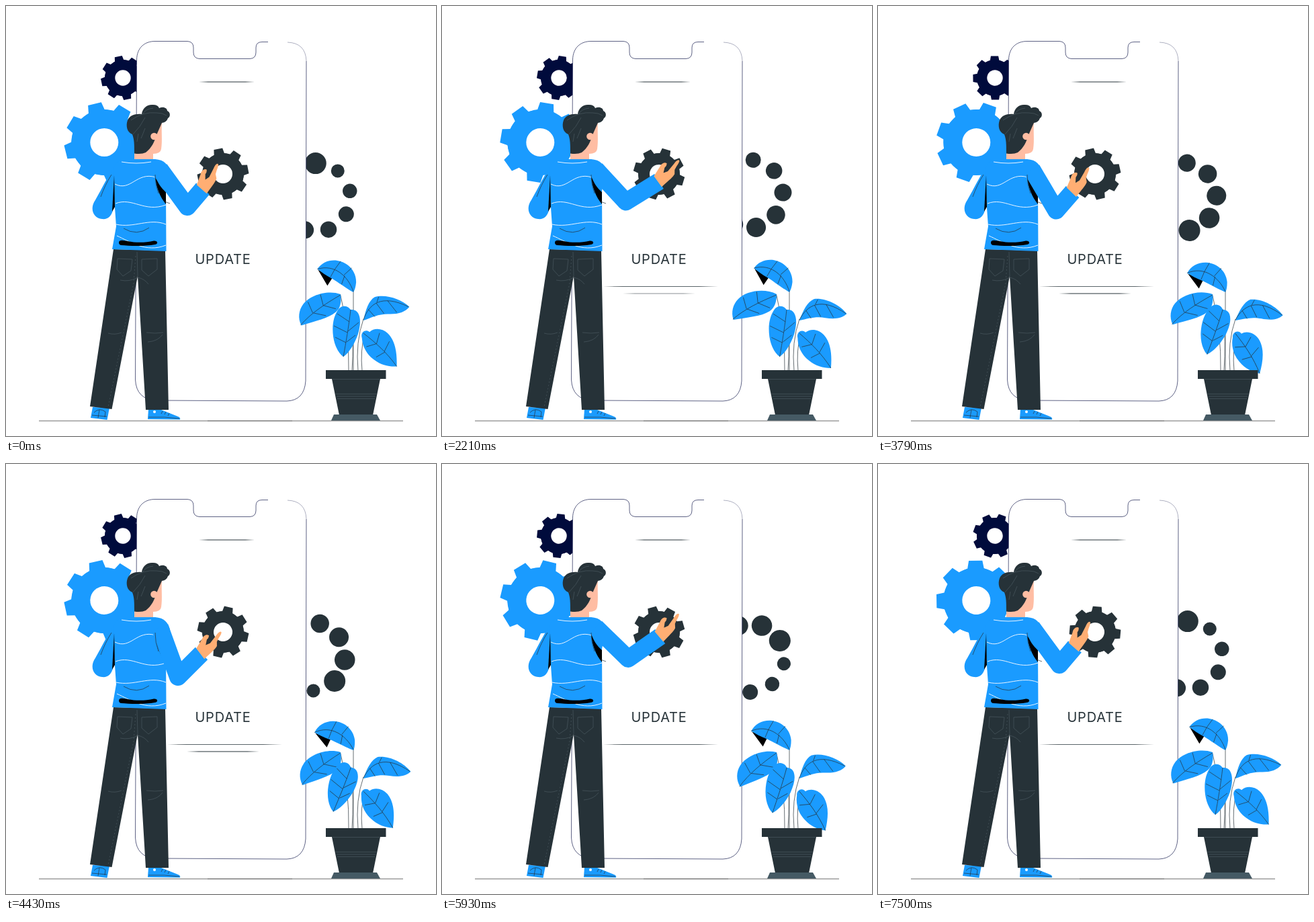
An HTML page that plays this animation: 640x640 px, repeating every 7.71 s.

```html
<!DOCTYPE html>
<html lang="en">
<head>
<meta charset="utf-8">
<title>Update</title>
<style>
  html, body { margin: 0; width: 100%; height: 100%; overflow: hidden; background: #fff; }
  svg { display: block; width: 100vw; height: 100vh; }
  .blue { fill: #1a9bff; }
  .dark { fill: #263238; }
  .navy { fill: #000b3c; }
  .black { fill: #000; }
  .white { fill: #fff; }
  .face { fill: #ffbda3; }
  .hand { fill: #ffae73; }
  .line { fill: none; stroke: #263238; stroke-width: .7; }
  .wave { fill: none; stroke: #e8f4ff; stroke-width: 1; }
  .seam { fill: none; stroke: #4a585f; stroke-width: .7; }
  .edge { fill: none; stroke: #2a2f5c; stroke-width: .75; }
  .sleeve { fill: none; stroke: #1a9bff; stroke-width: 26; stroke-linejoin: round; }
  text { font: 400 20px Inter, "Open Sans", sans-serif; letter-spacing: .8px; }
</style>
</head>
<body>
<svg viewBox="0 0 640 640">
  <g id="smallGear"></g>
  <g id="bigGear"></g>
  <g id="ring" class="dark"></g>

  <!-- phone -->
  <path class="white" d="M194.500 80C195 62 206 52.500 222 52.500H270Q279 53 279 62V69Q279 78 288 78.500H363Q372 78 372 69V62Q372 53.500 381 53.500H418Q446 54 447 82L446 558Q444 587 418 588L224 587Q194 586 192.500 556Z"/>
  <path class="edge" d="M447 82L446 558Q444 587 418 588L224 587Q194 586 192.500 556L194.500 80C195 62 206 52.500 222 52.500H270Q279 53 279 62V69Q279 78 288 78.500H363Q372 78 372 69V62Q372 53.500 381 53.500H390"/>
  <path class="edge" stroke-opacity=".5" d="M419 54Q446 55 447 82"/>
  <path id="header" class="dark"/>
  <path id="lineA" class="dark"/>
  <path id="lineB" class="dark"/>
  <text class="dark" x="323" y="384" text-anchor="middle">UPDATE</text>
  <g id="screenGear"></g>

  <path d="M49 617.500H591" stroke="#9b9b9b" stroke-width="1.400"/>
  <path d="M300 617.500H426" stroke="#6d6d6d" stroke-width="1.200"/>

  <!-- man -->
  <path class="blue" d="M129 597L154 598L150.500 616L126 613Z"/>
  <path class="blue" d="M212 600L231 601L257 611.500Q260 613 259 615.500L211 615Z"/>
  <path class="line" d="M131 605Q139 597 148 604L147 612M128 609L150 611M139 601L137 613M233 603L231 607M238 604L236 608M243 606L241 610M212 612Q236 611 258 614"/>
  <circle class="white" cx="221" cy="604" r="2"/>
  <path class="dark" d="M160 362L125 596L157.500 600L196 402L208 601L242 601L237 364Z"/>
  <path class="seam" d="M166 376L165 392L174 402L186 394L188 377ZM202 377V393L212 402L225 392V376ZM195 366L196 402M170 408Q184 411 196 404Q206 406 212 414M152 487Q162 490 172 486M209 486Q222 488 234 486M211 500Q226 499 233 489"/>
  <path class="seam" stroke-dasharray="2 3" d="M193 372L190 412L152 597"/>
  <path class="blue" d="M163 236C152 252 139 279 131 292C125 304 131 316 143 317C151 318 157 313 159 304L163 280Z"/>
  <path class="line" d="M157 251C150 262 145 273 141 284"/>
  <path class="blue" d="M160 246C161 234 168 228 180 228H222C236 229 241 236 244 246L238 275L238.500 365L158 362L164 328L162 300Z"/>
  <path class="black" d="M161 252L158 306L162 299Z"/>
  <path class="wave" d="M172 232Q194 236 216 232M162 265C186 277 194 246 223 255M163 294C188 284 206 308 238 296M164 325C190 331 214 315 238 325M165 342C184 350 208 368 238 356"/>
  <path class="line" d="M175 331Q195 343 213 330"/>
  <path class="black" d="M168 352C168 347 176 349 181 350C195 353 209 352 220 349.500C226 349 227 354 222 355C205 358 184 357 171 356Q168 355 168 352Z"/>
  <path class="black" d="M222 252C223 269 229 284 238 295V277C230 270 225 262 222 252Z"/>
  <path class="line" d="M236 291L244 294"/>
  <path id="arm" class="sleeve"/>
  <path class="line" d="M222 251Q222 266 227 279"/>
  <path class="face" d="M232 171C231 188 233 200 231 213Q230 220 219 220V228H191V218L212 208L222 182Z"/>
  <path class="dark" d="M191 219.500C191 206 191 199 188 191C180 188 178 178 181 170C184 163 192 160 202 161C203 152 210 146 219 147Q226 147 228 152C234 149 240 152 240 156C245 158 245 165 241 167Q239 173 232 174L224 192C221 202 217 211 208 218Q202 221 191 219.500Z"/>
  <circle class="face" cx="220.500" cy="194" r="5.300"/>
  <path class="seam" d="M186 170Q204 157 224 159Q233 159 239 163M203 161Q208 153 219 152M189 191Q200 180 207 166M207 182Q204 190 201 197M197 190L195 202"/>
  <g id="hand">
    <path class="dark" d="M-1 -26L9 -31L7 -18L0 -13Z"/>
    <path class="hand" d="M-10 -4L-7.500 -20C-7.500 -26 -4 -30 0 -29Q1.500 -26 -.5 -22L1 -14L6 -19L10 -33C11 -38 13 -42 15.500 -40.500Q16.500 -38 15 -31L14.500 -25L17 -19C16 -12 12 -6 7 6Z"/>
  </g>

  <!-- plant -->
  <path class="line" d="M517 424V543M498 431Q511 485 510 543M514 455Q518 500 515 543M532 466Q520 500 524 543M534 488Q527 512 530 543"/>
  <g id="leafD">
    <path class="blue" d="M530 494C527 486 535 480 541 485C548 478 560 479 568 486C580 497 583 515 583 535C572 536 560 534 549 526C537 518 531 506 530 494Z"/>
    <path class="line" d="M532 487C550 500 568 515 583 535M552 502L556 486M564 513L571 498M552 502L537 507M565 514L552 522"/>
  </g>
  <g id="leafE">
    <path class="blue" d="M532 468C536 452 541 439 550 434C566 430 589 438 601 450.500C595 458 584 461 570 460C555 459 545 464 532 468Z"/>
    <path class="line" d="M532 467C541 444 560 429 600 450.500M553 442L556 434M552 443L563 459M569 440L582 458M540 452L549 463"/>
  </g>
  <g id="leafB">
    <path class="blue" d="M498 429C500 440 499 450 492 456C481 466 464 470 442 478.500C436 468 437 456 443 447C452 433 478 423 498 429Z"/>
    <path class="line" d="M441 478C455 460 475 445 498 430M458 459L450 443M473 447L468 431M459 459L478 462M473 447L492 451"/>
  </g>
  <g id="leafC">
    <path class="blue" d="M513 452C508 445 500 445 495 451C487 462 485 476 487 492C489 506 495 517 502 522C512 515 520 500 524 488C528 474 528 464 524 457C521 452 516 452 513 452Z"/>
    <path class="line" d="M513 452C510 478 506 500 502 522M511 470L493 458M508 486L488 476M506 501L490 493M509 484L525 471M507 500L520 490"/>
  </g>
  <g id="leafA">
    <path class="black" d="M463 395L485 406L478 418Z"/>
    <path class="blue" d="M462 394C468 384 479 379 491 380C508 382 520 395 520.500 411Q520 421 517 426C503 419 492 411 484 407C475 403 468 398 462 394Z"/>
    <path class="line" d="M462 394C487 385 508 402 517 425M488 393L496 381M502 401L513 390M488 393L482 405M503 402L499 415"/>
  </g>
  <path class="dark" d="M476 542H565.500V555H557L546 609H496L485 555H476Z"/>
  <path fill="#455a64" d="M488 608H552L557 617H484Z"/>
  <path class="seam" d="M486 555.500H556M491 577.500H551M492 581H550M493 584.500H549"/>
</svg>
<script>
// All parts rest between the end of CYCLE and the end of LOOP.
const LOOP = 7710, CYCLE = 7140, TAU = Math.PI * 2;
const $ = id => document.getElementById(id);
const set = (id, name, value) => $(id).setAttribute(name, value);
const polar = (r, deg) => [r * Math.cos(deg * TAU / 360), r * Math.sin(deg * TAU / 360)];
const clamp = v => Math.max(0, Math.min(1, v));
const fade = (t, start) => clamp((t - start) / 300);

// Eight-toothed gear around the origin, with a tooth at `phase` degrees.
function makeGear(id, x, y, outer, body, hole, phase, cls) {
  const points = [];
  for (let a = phase; a < phase + 360; a += 45) {
    points.push(polar(body, a - 14.5), polar(outer, a - 9.7), polar(outer, a + 9.7), polar(body, a + 14.5));
  }
  $(id).innerHTML = `<circle class="${cls}" r="${body}"/><polygon class="${cls}" points="${points}"/>
    <circle class="white" r="${hole}"/>`;
  return deg => set(id, 'transform', `translate(${x} ${y}) rotate(${deg})`);
}

const turnBig = makeGear('bigGear', 146.3, 203, 60, 49, 21, 31, 'blue');
const turnSmall = makeGear('smallGear', 174, 107, 33, 27, 11.7, 33, 'navy');
const turnScreen = makeGear('screenGear', 323, 250, 38.5, 31, 14, 34, 'dark');

// Thin rule that tapers to points at both ends.
function taper(id, x1, x2, y) {
  const inset = (x2 - x1) / 6;
  set(id, 'd', `M${x1} ${y}L${x1 + inset} ${y - .4}H${x2 - inset}L${x2} ${y}L${x2 - inset} ${y + .4}H${x1 + inset}Z`);
}
taper('header', 287, 370, 113);
taper('lineA', 240, 411, 417.3);
taper('lineB', 269, 377, 428);

// Nine dots growing clockwise; the ring turns about a slightly offset pivot.
$('ring').innerHTML = Array.from({ length: 9 }, (_, i) => {
  const [x, y] = polar(51, -51 + i * 40);
  return `<circle cx="${x + 4.4}" cy="${y + .9}" r="${10 + i * .75}"/>`;
}).join('');

// Smooth closed curve through rows of [phase, ...values], phase in 0..1.
function closedCurve(keys, p) {
  const n = keys.length;
  const time = k => keys[(k + n) % n][0] + Math.floor(k / n);
  const i = keys.filter(k => k[0] <= p).length - 1;
  const span = time(i + 1) - time(i), u = (p - time(i)) / span;
  const ease = u * u * (3 - 2 * u);
  return keys[i].slice(1).map((_, c) => {
    const value = k => keys[(k + n) % n][c + 1];
    const slope = k => (value(k + 1) - value(k - 1)) / (time(k + 1) - time(k - 1)) * span;
    return value(i) + (value(i + 1) - value(i)) * ease
      + u * (1 - u) * (slope(i) * (1 - u) - slope(i + 1) * u);
  });
}

// Key poses of one swipe: phase, elbow, wrist
const swipe = [
  [0, 270, 299, 293, 272],
  [.24, 256, 317, 291, 282],
  [.36, 257, 304, 293, 287],
  [.48, 263, 297, 315, 275],
  [.86, 288, 286, 325, 244]
];

// Each leaf swings on a cosine: swings per cycle, mean, amplitude, phase of the peak
const leaves = [
  { id: 'leafA', pivot: '517 425', swings: 1, mean: 0, amp: 6, peak: .18 },
  { id: 'leafB', pivot: '498 430', swings: 1, mean: 4.3, amp: 6.8, peak: .28 },
  { id: 'leafC', pivot: '515 453', swings: 1, mean: 4.5, amp: 8.5, peak: .66 },
  { id: 'leafD', pivot: '531 486', swings: 3, mean: 7.5, amp: 8, peak: .62 },
  { id: 'leafE', pivot: '532 467', swings: 1, mean: 3, amp: 5.5, peak: .46 }
];

function draw(t) {
  const cycle = clamp(t / CYCLE);

  // The back gears pause briefly late in the cycle.
  const turn = 360 / CYCLE * (Math.min(t, 5700) + Math.max(0, Math.min(t, CYCLE) - 5957));
  turnBig(-turn);
  turnSmall(turn);
  turnScreen(286 * clamp(t / 7500) ** 1.12);
  set('ring', 'transform', `translate(457.300 284.200) rotate(${-360 * cycle})`);
  set('lineA', 'opacity', fade(t, 650));
  set('lineB', 'opacity', fade(t, 2050) - fade(t, 4700));

  // The hand tilts with the wrist's place on the screen.
  const [ex, ey, wx, wy] = closedCurve(swipe, cycle * 2 % 1);
  const tilt = 11 + .9 * (wx - 293) + 1.3 * (wy - 272);
  set('arm', 'd', `M229 243L${ex} ${ey}L${wx} ${wy}`);
  set('hand', 'transform', `translate(${wx} ${wy}) rotate(${tilt})`);

  for (const { id, pivot, swings, mean, amp, peak } of leaves) {
    const angle = mean + amp * Math.cos(TAU * (cycle * swings - peak));
    set(id, 'transform', `rotate(${angle} ${pivot})`);
  }
}

function tick() {
  draw(performance.now() % LOOP);
  requestAnimationFrame(tick);
}
tick();
</script>
</body>
</html>
```
